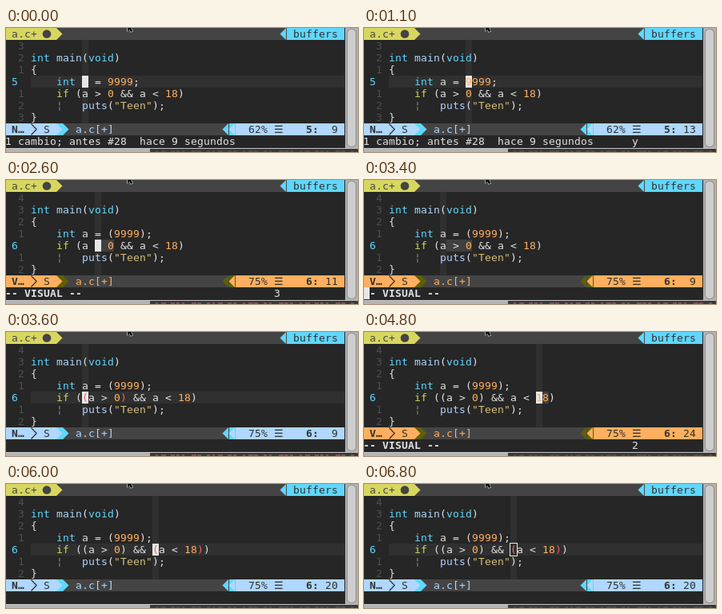
These frames come from a looping animation (440 px wide and 156 px high, 7000 ms). An HTML page with a canvas:

```html
<!DOCTYPE html>
<html lang="es">
<head>
<meta charset="utf-8">
<style>
html, body { margin: 0; width: 440px; height: 156px; overflow: hidden; background: #262626; }
canvas { display: block; }
</style>
</head>
<body>
<canvas id="stage" width="440" height="156"></canvas>
<script>
const ctx = document.getElementById('stage').getContext('2d');
const LOOP = 7000, CW = 8, RH = 15, COLS = 53;
const MONO = '"DejaVu Sans Mono", "DejaVu Sans", "Liberation Mono", monospace';
const C = {
  bg: '#262626', bar: '#444444', line: '#303030', sel: '#404040', dim: '#4e4e4e',
  text: '#e4e4e4', type: '#5fd7ff', func: '#afd7ff', key: '#c6e05c', num: '#ffaf5f',
  str: '#d7c078', match: '#ff5f5f', cursor: '#e8e8e8', tab: '#d7d75f', tabInk: '#444444',
  ink: '#303030', guide: '#8a8a8a'
};
const MODES = {
  N: { main: '#afd7ff', edge: '#5fd7ff' },
  V: { main: '#ffaf5f', edge: '#5f5f00' }
};

// Each step changes only the listed fields of the editor state.
const STEPS = [
  { t: 0, mode: 'N', line: 5, col: 12, anchor: 0, cmd: '', prompt: false, hollow: false,
    decl: 'int a = 9999;', cond: 'if (a > 0 && a < 18)',
    msg: '1 cambio; antes #28  hace 9 segundos' },
  { t: 400, col: 14 },
  { t: 600, col: 16 },
  { t: 1100, cmd: 'y' },
  { t: 1200, cmd: 'ys' },
  { t: 1300, cmd: 'ysi' },
  { t: 1400, cmd: 'ysiw', prompt: true },
  { t: 1600, cmd: '', prompt: false, decl: 'int a = (9999);' },
  { t: 2100, line: 6 },
  { t: 2600, mode: 'V', anchor: 16, col: 14, cmd: '3', msg: '-- VISUAL --' },
  { t: 2800, col: 12, cmd: '5' },
  { t: 3300, cmd: '', prompt: true },
  { t: 3600, mode: 'N', prompt: false, msg: '', cond: 'if ((a > 0) && a < 18)' },
  { t: 3900, col: 29 },
  { t: 4300, col: 28 },
  { t: 4800, mode: 'V', anchor: 28, col: 27, cmd: '2', msg: '-- VISUAL --' },
  { t: 5000, col: 25, cmd: '4' },
  { t: 5200, col: 23, cmd: '6' },
  { t: 5500, cmd: '', prompt: true },
  { t: 5800, mode: 'N', prompt: false, msg: '', cond: 'if ((a > 0) && (a < 18))' },
  { t: 6800, hollow: true }
];

const stateAt = t => Object.assign({}, ...STEPS.filter(s => s.t <= t));
const cx = col => col * CW - 1;

function rect(x, y, w, h, color) {
  ctx.fillStyle = color;
  ctx.fillRect(x, y, w, h);
}

function cells(col, row, n, color) {
  rect(cx(col), row * RH, n * CW, RH, color);
}

function put(str, col, row, color, bold) {
  ctx.font = (bold ? 'bold ' : '') + '13px ' + MONO;
  ctx.fillStyle = color;
  [...str].forEach((ch, i) => ctx.fillText(ch, cx(col + i), row * RH + 12));
}

function poly(points, color) {
  ctx.fillStyle = color;
  ctx.beginPath();
  points.forEach(([x, y]) => ctx.lineTo(x, y));
  ctx.closePath();
  ctx.fill();
}

// Powerline separator: dir 1 points right, -1 points left with a thin gap at its base.
function arrow(col, row, dir, color, back) {
  const y = row * RH, base = dir > 0 ? cx(col) : cx(col + 1) - 1;
  cells(col, row, 1, back);
  poly([[base, y], [base + dir * 7.5, y + RH / 2], [base, y + RH]], color);
}

function colorize(src) {
  const out = [];
  for (const tok of src.match(/"[^"]*"|[a-z]+|\d+|./g) || []) {
    let color = C.text;
    if (tok[0] === '"') color = C.str;
    else if (/^(int|void)$/.test(tok)) color = C.type;
    else if (/^(main|puts)$/.test(tok)) color = C.func;
    else if (tok === 'if') color = C.key;
    else if (/^\d/.test(tok)) color = C.num;
    else if (tok === '¦') color = C.guide;
    for (const ch of tok) out.push({ ch, color });
  }
  return out;
}

function markPair(chars, at) {
  const first = chars[at] && chars[at].ch;
  if (first !== '(' && first !== ')') return;
  const dir = first === '(' ? 1 : -1;
  let depth = 0;
  for (let i = at; chars[i]; i += dir) {
    if (chars[i].ch === '(') depth++;
    if (chars[i].ch === ')') depth--;
    if (depth === 0) {
      chars[at].color = chars[i].color = C.match;
      return;
    }
  }
}

function drawTabs() {
  cells(0, 0, COLS, C.bar);
  cells(0, 0, 8, C.tab);
  put('a.c+', 1, 0, C.tabInk);
  ctx.beginPath();
  ctx.arc(51, 7.5, 5.3, 0, Math.PI * 2);
  ctx.fill();
  arrow(8, 0, 1, C.tab, C.bar);
  arrow(43, 0, -1, C.type, C.bar);
  cells(44, 0, 9, C.type);
  put('buffers', 45, 0, C.ink);
}

function drawCode(s) {
  const source = ['', 'int main(void)', '{', '    ' + s.decl, '    ' + s.cond,
                  '    ¦   puts("Teen");', '}'];
  const visual = s.mode === 'V';
  const cursorRow = s.line - 1;
  if (!visual) cells(4, cursorRow, COLS - 4, C.line);
  rect(cx(s.col), RH, CW, 7 * RH, C.line);
  if (visual) cells(s.col + 1, cursorRow, s.anchor - s.col, C.sel);

  source.forEach((src, i) => {
    const row = i + 1, here = row === cursorRow;
    if (here) put(String(s.line), 1, row, C.type);
    else put(String(Math.abs(row - cursorRow)), 2, row, C.dim);
    const chars = colorize(src);
    if (here && !visual) markPair(chars, s.col - 4);
    if (here && !s.prompt && !s.hollow) cells(s.col, row, 1, C.cursor);
    chars.forEach((c, k) => put(c.ch, k + 4, row, c.color));
  });

  if (s.hollow) {
    ctx.strokeStyle = C.cursor;
    ctx.lineWidth = 1;
    ctx.strokeRect(cx(s.col) - 0.5, cursorRow * RH - 0.5, CW + 1, RH + 1);
  }
}

function drawStatus(s) {
  const { main, edge } = MODES[s.mode], row = 8, y = row * RH;
  cells(0, row, COLS, C.bar);
  cells(0, row, 8, main);
  put(s.mode + '…', 1, row, C.ink, true);
  ctx.strokeStyle = C.ink;
  ctx.lineWidth = 1.2;
  ctx.beginPath();
  ctx.moveTo(cx(4) + 0.5, y + 0.5);
  ctx.lineTo(cx(5) - 0.8, y + 7.5);
  ctx.lineTo(cx(4) + 0.5, y + 14.5);
  ctx.stroke();
  put('S', 6, row, C.ink);
  arrow(8, row, 1, main, edge);
  arrow(9, row, 1, edge, C.bar);
  put('a.c[+]', 11, row, main);

  arrow(34, row, -1, edge, C.bar);
  arrow(35, row, -1, main, edge);
  cells(36, row, 17, main);
  put(s.line === 5 ? '62%' : '75%', 38, row, C.ink);
  put('☰', 42, row, C.ink);
  put(s.line + ':', 47, row, C.ink, true);
  put(String(s.col - 3).padStart(3), 49, row, C.ink);
}

function drawMessage(s) {
  if (s.prompt) cells(0, 9, 1, C.cursor);
  put(s.msg, 0, 9, C.text, s.mode === 'V');
  put(s.cmd, 42, 9, C.text);
}

function drawScrollbar() {
  rect(424, 0, 16, 152, '#b0b0b0');
  ctx.beginPath();
  ctx.roundRect(426.5, 1.5, 11, 148, 5);
  ctx.fillStyle = '#cecece';
  ctx.fill();
  ctx.strokeStyle = '#8e8e8e';
  ctx.lineWidth = 1;
  ctx.stroke();
}

function drawDesktop(t) {
  rect(0, 151, 440, 1, '#c4c4c4');
  rect(0, 152, 180, 4, '#b4b4b4');
  rect(180, 152, 260, 4, '#3a3838');
  const speck = t >= 2200 && t < 4800 ? '#7c5058' : '#4c4a4a';
  for (let x = 184; x < 436; x += 9) {
    rect(x + (x * 7) % 5, 154, 3 + (x * 3) % 4, 2, speck);
  }
}

function drawPointer(t) {
  const x = t >= 6400 && t < 6500 ? 138 : t >= 6500 && t < 6600 ? 122 : 152;
  const shape = grow => [
    [x - grow, 0], [x - grow, 4 + grow], [x + 2.5, 2 + grow],
    [x + 4 - grow, 5 + grow], [x + 6 + grow, 4 + grow], [x + 4.5 + grow, 0]
  ];
  poly(shape(0.8), '#c8c8c8');
  poly(shape(0), '#000');
}

function draw(now) {
  const t = now % LOOP, s = stateAt(t);
  rect(0, 0, 440, 156, C.bg);
  drawTabs();
  drawCode(s);
  drawStatus(s);
  drawMessage(s);
  drawScrollbar();
  drawDesktop(t);
  drawPointer(t);
}

let start;
function tick(now) {
  if (start === undefined) start = now;
  draw(Math.max(0, now - start));
  requestAnimationFrame(tick);
}
draw(0);
requestAnimationFrame(tick);
</script>
</body>
</html>
```
